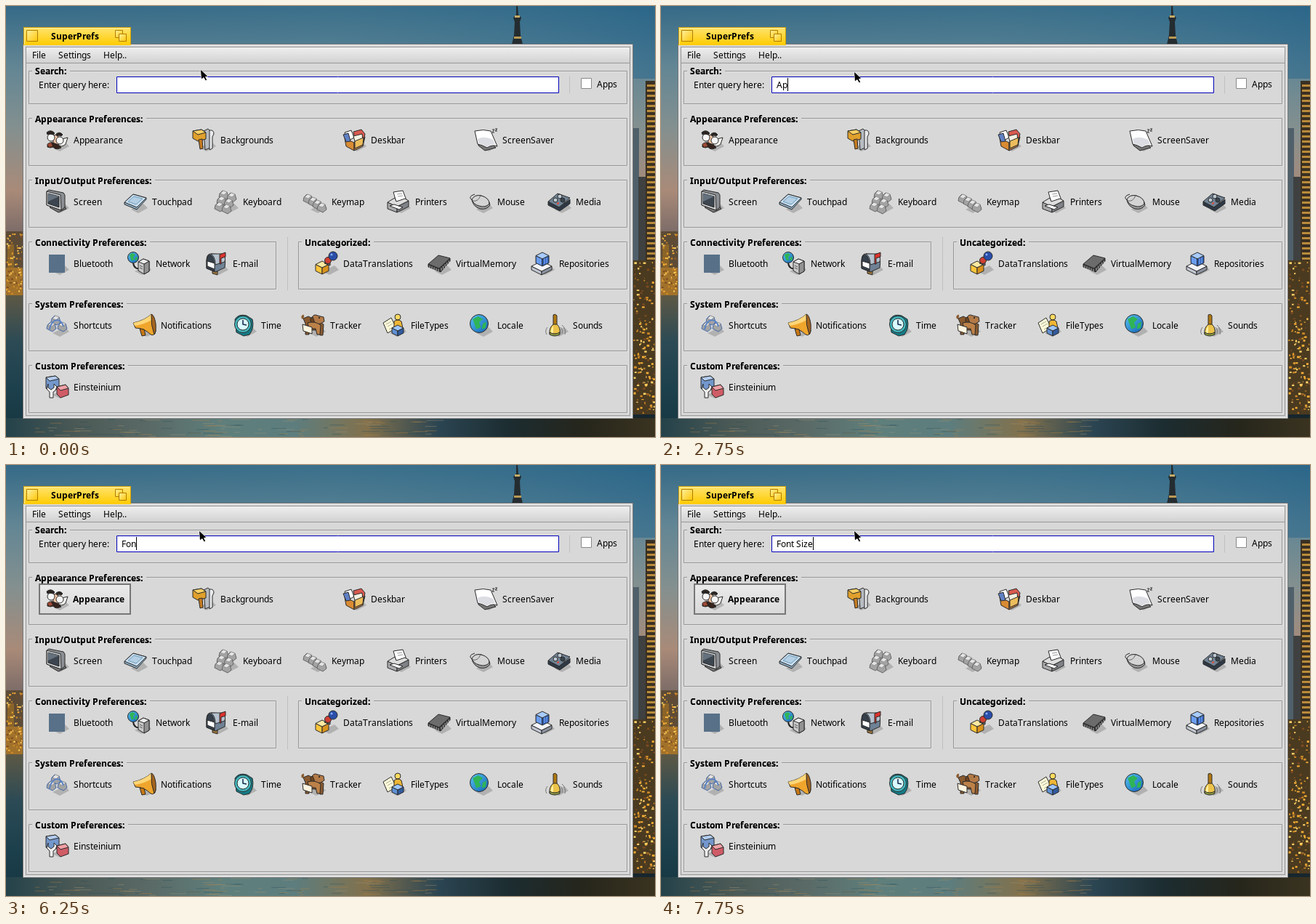
An HTML page with a canvas for the animation above (8000 ms loop, 893 by 593 pixels).

```html
<!DOCTYPE html>
<html lang="en">
<head>
<meta charset="utf-8">
<title>Preferences search</title>
<style>
html, body { margin: 0; width: 100%; height: 100%; overflow: hidden; background: #2d6585; }
canvas { display: block; width: 893px; height: 593px; }
</style>
</head>
<body>
<canvas id="stage" width="893" height="593"></canvas>
<script>
const W = 893, H = 593, LOOP = 8000;
const FONT = '12px "Noto Sans", sans-serif', BOLD = 'bold ' + FONT;
const stage = document.getElementById('stage').getContext('2d');
let c = stage;

function rect(color, x, y, w, h) { c.fillStyle = color; c.fillRect(x, y, w, h); }
function frame(color, x, y, w, h) { c.strokeStyle = color; c.lineWidth = 1; c.strokeRect(x + .5, y + .5, w - 1, h - 1); }
// Glyphs advance by whole pixels; returns the end of the text
function text(s, x, y, font = FONT) {
  c.font = font;
  c.fillStyle = '#000';
  for (const ch of s) {
    c.fillText(ch, x, y);
    x += Math.round(c.measureText(ch).width);
  }
  return x;
}
function grad(x0, y0, x1, y1, ...colors) {
  const g = c.createLinearGradient(x0, y0, x1, y1);
  colors.forEach((k, i) => g.addColorStop(i / (colors.length - 1), k));
  return g;
}
function p(fill, d, line = '#2a2a2a', width = 1) {
  const path = new Path2D(d);
  if (fill) { c.fillStyle = fill; c.fill(path); }
  if (line) { c.strokeStyle = line; c.lineWidth = width; c.lineJoin = 'round'; c.stroke(path); }
}
function disc(fill, x, y, r, line = '#2a2a2a') {
  p(fill, `M${x - r} ${y}a${r} ${r} 0 1 1 ${2 * r} 0a${r} ${r} 0 1 1 ${-2 * r} 0z`, line);
}
// Isometric block whose top face starts at its back corner (x, y)
function block(x, y, s, h, top, left, right) {
  const k = s / 2;
  p(left, `M${x - s} ${y + k}l${s} ${k}v${h}l${-s} ${-k}z`);
  p(right, `M${x + s} ${y + k}l${-s} ${k}v${h}l${s} ${-k}z`);
  p(top, `M${x} ${y}l${s} ${k}l${-s} ${k}l${-s} ${-k}z`);
}
function key(x, y, line = '#666') {
  p('#a4a4a4', `M${x} ${y + 4}l4-4 6 2 2 7-5 4-8-4z`, line);
  p('#e4e4e4', `M${x + 1} ${y + 4}l4-4 5 2-4 4z`, '#999');
}
function globe(x, y, r) {
  disc(grad(x - r, y - r, x + r, y + r, '#58c4f4', '#1262b4'), x, y, r);
  const u = r / 10;
  p('#2fb457', `M${x - 7 * u} ${y - 5 * u}l${6 * u} ${-3 * u}l${5 * u} ${3 * u}l${-4 * u} ${4 * u}l${2 * u} ${5 * u}l${-5 * u} ${2 * u}z`, null);
  p('#2fb457', `M${x + 4 * u} ${y}l${4 * u} ${-2 * u}l${-u} ${7 * u}l${-4 * u} ${u}z`, null);
}

const icons = {
  Appearance() {
    p('#f4f2ee', 'M17 14Q24 16 31 13L28 22Q22 28 17 22z');
    p('#f0c3a4', 'M11 10L17 9 20 21Q16 25 11 21z');
    disc('#f6f6f6', 8, 13, 5); disc('#f6f6f6', 20, 17, 5);
    p('#2b2421', 'M2 6Q8 1 13 7L11 9Q6 7 3 9zM15 8Q20 4 24 9L22 11Q19 9 16 11z');
    p('#35231d', 'M3 22Q8 18 13 21 19 22 22 27 14 31 11 26 7 28 3 26z');
    p('#9c4a35', 'M3 22L8 20 10 25 5 26z', null);
  },
  Backgrounds() {
    p('#b7bcc2', 'M16 4L22 1 25 4V27L18 30z');
    p('#e8eaec', 'M24 3Q30 2 30 8L28 12V28L24 30z');
    p('#e0a02c', 'M1 4L13 2 19 6V15L8 18 1 14z');
    p('#f8cf63', 'M1 4L13 2 19 6 8 9z');
    p('#c57c21', 'M9 16L14 15 15 28 11 29z');
  },
  Deskbar() {
    p('#d98b33', 'M3 14L16 20V31L5 25z'); p('#b87a45', 'M16 20L31 12 28 25 16 31z');
    p('#d95a50', 'M15 5L26 2 31 8 29 17 18 19z');
    p('#fff', 'M3 6L12 3 16 13 7 18z'); p('#5f80c4', 'M1 9L8 7 11 18 5 19z');
    p('#f4f0e0', 'M15 11L27 8 28 17 18 22z'); p('#ecbd5c', 'M17 18L29 13 28 23 17 28z');
  },
  ScreenSaver() {
    p('#777', 'M5 14L26 23 30 27 15 31 6 24z');
    p('#fff', 'M1 4Q13 1 23 4L29 18 32 25Q25 22 18 27 11 23 5 22z');
    p('#dcdde3', 'M5 15Q14 10 26 16L29 22Q22 22 18 26 11 22 6 21z', null);
    p(null, 'M25 2h3l-3 4h3M29 1h3l-3 3h3');
  },
  Screen() {
    p('#777', 'M6 24L18 31 29 26 25 20z');
    p('#8b8e92', 'M2 2L5 0 25 4 27 7V24L22 28 2 21z'); p('#d5d7d9', 'M2 2L21 7 22 28 2 21z');
    p('#3d4650', 'M4 5L19 9V24L4 19z'); p('#65717d', 'M4 5L19 9 4 16z', null);
  },
  Touchpad() {
    p('#8eaec4', 'M1 17L13 6 31 11V13L18 27 1 20z');
    p('#c9def0', 'M1 17L13 6 31 11 18 24z'); p('#b4cfe4', 'M6 16L14 9 26 12 17 20z', '#6d9bb7');
  },
  Keyboard() { key(7, 1); key(18, 4); key(4, 9); key(14, 12); key(1, 17); key(11, 20); },
  Keymap() { key(1, 6); key(8, 10); key(14, 14); key(20, 18); },
  Printers() {
    p('#fff', 'M9 3L22 1 27 14 13 17z');
    p('#a9abad', 'M1 17L14 23V31L1 26z'); p('#7f8286', 'M14 23L30 15V23L14 31z');
    p('#ddd', 'M1 17L11 11 13 16 25 12 30 15 14 23z');
    p('#fff', 'M4 22L17 27 22 24 10 20z'); p(null, 'M14 6l7-1M15 9l7-1', '#999');
  },
  Mouse() {
    p(null, 'M4 14Q-2 9 8 6');
    p('#999', 'M4 14Q8 6 17 8 28 12 29 21 24 28 15 26 6 23 4 14z');
    p('#d4d4d4', 'M4 13Q8 6 17 8 28 11 28 19 23 25 14 22 6 20 4 13z');
    p(null, 'M5 15Q12 17 16 8', '#666');
  },
  Media() {
    p('#2e3945', 'M1 16L16 24 31 13V19L17 29 1 21z');
    p('#718395', 'M1 16L14 5 31 11 16 24z');
    disc('#bcc8d0', 11, 14, 3); disc('#bcc8d0', 17, 9, 3); disc('#3a4650', 21, 14, 3);
    p('#e24a3e', 'M13 18l3-1v2l-3 1z', null);
  },
  Bluetooth() { rect('#587188', 5, 4, 22, 25); },
  Network() {
    p(null, 'M8 16Q10 25 18 23', '#222', 2);
    globe(8, 8, 7.5);
    p('#c9c9c9', 'M15 14L22 10 30 13V27L23 31 15 26z'); p('#929292', 'M23 17L30 13V27L23 31z');
    p('#ececec', 'M15 14L22 10 30 13 23 17z');
    p(null, 'M17 19l4 2M17 22l4 2', '#555');
  },
  'E-mail'() {
    p('#9d753c', 'M11 24L18 27V32L11 30z');
    p('#6f8194', 'M3 12Q3 2 10 3L26 4Q30 8 28 22L15 28 3 23z');
    p('#b6c2ce', 'M9 3L25 3Q30 7 28 14L15 18Q15 7 9 3z');
    p('#35404b', 'M3 12Q4 3 9 5 14 8 14 27L3 23z'); p('#fff', 'M4 13L14 16V24L4 20z');
    p('#db332d', 'M21 4L29 1V7L23 9V17L21 17z');
  },
  DataTranslations() {
    block(10, 13, 9, 9, '#ffe9a0', '#ffc53a', '#d8921d');
    p('#777', 'M13 16l8-4v7z');
    disc('#cf4034', 18, 12, 4.5); disc('#2a4ea8', 25, 6, 6); disc('#88adff', 23, 4, 1.5, null);
  },
  VirtualMemory() {
    p('#333', 'M1 17L16 23 31 9V13L18 28 1 21z');
    p('#6c6c6c', 'M1 17L15 5 31 9 16 23z');
    for (let i = 0; i < 5; i++) p(null, `M${3 + 3 * i} ${19 + 1.2 * i}v4M${19 + 2.6 * i} ${22 - 2.4 * i}v4`, '#bbb');
  },
  Repositories() {
    block(15, 13, 14, 5, '#f2f4f8', '#c1c6d0', '#8b929e');
    block(16, 1, 9, 10, '#a8cbff', '#5a91e8', '#2f61b8');
    p(null, 'M10 8v8M13 9v8M19 9v8M22 8v8', '#8db7ff');
  },
  Shortcuts() {
    key(9, 3, '#456aa8'); key(3, 12, '#456aa8'); key(18, 12, '#456aa8');
    p(null, 'M6 22Q8 10 16 9 23 10 25 18', '#5b83c4', 2);
  },
  Notifications() {
    p('#f0a52c', 'M1 13Q16 10 26 1L32 24Q30 32 25 29 16 20 4 20z');
    p('#ffd677', 'M1 13Q16 10 26 1L28 8Q17 15 3 17z', null);
    p('#a5651e', 'M26 1Q30 2 32 14 33 26 30 29 25 16 26 1z');
    p('#c77815', 'M10 21L16 22 18 30 13 31z');
  },
  Time() {
    p('#147b86', 'M3 8Q8 0 19 3L27 8Q30 20 23 29L15 31 5 26z');
    disc('#43b8bf', 14, 15, 11.5); disc('#d9fbff', 14, 15, 8); p(null, 'M14 9V15L19 16', '#124', 1.5);
  },
  Tracker() {
    p('#8a5a2f', 'M2 7L9 4 17 8 30 15 29 30H25L23 23 10 23V29H5V14z');
    p('#b37a48', 'M14 6Q16 0 22 3L30 5 31 11 26 14 18 15z'); p('#70451f', 'M15 5Q10 6 13 13L18 13z');
    p('#bc8148', 'M8 13Q18 10 26 16L25 29H21L19 21 10 21z');
    p('#fff4df', 'M1 15L14 19V28L2 24z'); disc('#111', 24, 6, 1, null); p(null, 'M2 7Q-1 4 3 3', '#8a5a2f', 3);
  },
  FileTypes() {
    p('#fffbd9', 'M1 13L12 6 19 20 7 27z'); p(null, 'M5 15l7-4M7 18l7-4M9 22l7-4', '#aa9');
    disc('#ffda60', 21, 5, 4); p('#eeb635', 'M16 11Q21 7 26 11L28 20 16 22z');
    block(21, 16, 8, 7, '#9ec6ff', '#5f91d5', '#315b9e');
  },
  Locale() { globe(14, 14, 12.5); },
  Sounds() {
    p('#b27912', 'M12 2Q15 0 17 3L17 16H12z');
    p('#ecc34a', 'M12 15H17Q22 19 21 27 16 32 7 28 6 20 12 15z'); p('#ffef9e', 'M12 17Q8 22 9 27L12 27z', null);
    p('#8c9940', 'M7 26Q14 30 21 26V29Q14 33 7 29z');
    p(null, 'M4 19Q0 24 3 29M24 16Q30 21 28 29M22 19Q26 23 24 28', '#777');
  },
  Einsteinium() {
    p('#7397cc', 'M1 3L14 1 19 5V18L6 22 1 18z'); p('#b3cdf0', 'M1 3L14 1 19 5 6 8z');
    p('#cf5c66', 'M16 16L28 13 32 18V27L21 31 16 26z'); p('#f0a0a5', 'M16 16L28 13 32 18 21 21z');
    p('#eee', 'M4 12V17L8 20 12 17V12L16 16 14 21 11 23V31H6V23L2 19z');
  }
};

const groups = [
  ['Search:', 31, 89, 824, 46],
  ['Appearance Preferences:', 31, 154, 824, 66, 'Appearance 93 Backgrounds 295 Deskbar 502 ScreenSaver 683'],
  ['Input/Output Preferences:', 31, 239, 824, 66, 'Screen 93 Touchpad 201 Keyboard 326 Keymap 448 Printers 563 Mouse 676 Media 784'],
  ['Connectivity Preferences:', 31, 324, 341, 66, 'Bluetooth 93 Network 206 E-mail 312'],
  ['Uncategorized:', 402, 324, 453, 66, 'DataTranslations 464 VirtualMemory 619 Repositories 761'],
  ['System Preferences:', 31, 409, 824, 66, 'Shortcuts 93 Notifications 213 Time 351 Tracker 446 FileTypes 557 Locale 676 Sounds 780'],
  ['Custom Preferences:', 31, 494, 824, 66, 'Einsteinium 93']
];

function item(name, x, y, picked) {
  if (picked) {
    rect('#777', 45, y - 21, 127, 43);
    rect(grad(0, y - 19, 0, y + 20, '#eaeaea', '#d9d9d9'), 47, y - 19, 123, 39);
  }
  c.save();
  c.translate(x - 39, y - 16);
  p('rgba(0,0,0,.18)', 'M10 27L27 19 33 25 20 32z', null);
  icons[name]();
  c.restore();
  text(name, picked ? x - 1 : x, y + 5, picked ? BOLD : FONT);
}

function groupBox([title, x, y, w, h, list], picked) {
  frame('#e0e0e0', x + 1, y + 1, w, h);
  frame('#979797', x, y, w, h);
  const base = y + (list ? 6 : 5);
  const end = text(title, x + 9, base, BOLD);
  rect('#d8d8d8', x + 5, y - 1, end - x, 4);
  const words = list ? list.split(' ') : [];
  for (let i = 0; i < words.length; i += 2)
    item(words[i], +words[i + 1], y + 30, picked && words[i] === 'Appearance');
  text(title, x + 9, base, BOLD);
}

function city() {
  rect(grad(0, 0, 0, H, '#356a87', '#638694', '#84908f', '#a98a78', '#675d60', '#394c50', '#1f4450', '#123644'), 0, 0, W, H);
  rect(grad(0, 0, W, 0, 'rgba(80,125,145,0)', 'rgba(75,128,150,.25)', 'rgba(33,98,138,.5)'), 0, 0, W, 100);
  p('#242c30', 'M702 0h2l1 12 4 4-2 6 1 18 3 13H696l3-13 1-18-2-6 4-4z', null);
  rect('#c4ab68', 700, 13, 7, 3);
  rect('#b89a55', 699, 42, 10, 3);

  rect('#5d4b36', 0, 310, 24, 88);
  rect('#8a6429', 2, 328, 9, 70);
  rect('#a2722b', 0, 360, 24, 38);
  rect(grad(0, 398, 0, H, '#5d5845', '#2b4a55', '#1c404c', '#153540'), 0, 398, 24, 195);

  rect('#50606a', 863, 168, 8, 240);
  rect('#3f4040', 870, 235, 12, 180);
  rect('#3a3022', 880, 103, 13, 340);
  for (let y = 108; y < 390; y += 7) rect('#b98b3b', 882, y, 11, 3);
  rect('#4a3a20', 862, 350, 31, 215);
  rect('#17262d', 862, 562, 31, 31);

  rect(grad(0, 0, W, 0, '#24424a', '#4c5a56', '#5a6a66', '#5f7f7c', '#5d7d7e', '#82714c', '#2b4552', '#1c2c30', '#26261c', '#3a3320'), 0, 567, W, 26);
  let seed = 7;
  const rnd = () => (seed = seed * 16807 % 2147483647) / 2147483647;
  for (let i = 0; i < 260; i++) {
    c.fillStyle = ['#ffd367', '#d18b25', '#f5ad35', '#7b4b20'][i % 4];
    if (i % 3 === 0) c.fillRect(rnd() * 22, 312 + rnd() * 84, 1 + rnd() * 2, 2);
    else c.fillRect(863 + rnd() * 28, 352 + rnd() * 208, 1 + rnd() * 3, 1 + rnd() * 2);
  }
  for (let i = 0; i < 90; i++)
    rect(['#b88445', '#264c58', '#a49678'][i % 3] + '66', 40 + rnd() * 550, 568 + rnd() * 24, 5 + rnd() * 22, 1);
}

function dots(x, y0, y1) { for (let y = y0; y < y1; y += 2) rect('#a8a8a8', x, y, 1, 1); }

function yellowBox(x, y, s) {
  rect(grad(x, y, x + s, y + s, '#fff3a4', '#ffc400'), x, y, s, s);
  frame('#b37b00', x, y, s, s);
}

function paint(picked) {
  const sheet = document.createElement('canvas');
  sheet.width = W; sheet.height = H;
  c = sheet.getContext('2d');
  city();
  rect('#777', 23, 52, 840, 516);
  rect('#eee', 24, 53, 838, 514);
  rect('#d8d8d8', 25, 54, 836, 512);
  frame('#999', 27, 56, 832, 508);
  rect(grad(0, 29, 0, 54, '#ffe471', '#ffcb00'), 24, 29, 148, 25);
  p(null, 'M24.5 53V29.5H171.5V53', '#d5a000');
  p(null, 'M25.5 53V30.5H170', '#fff0a8');
  yellowBox(28, 33, 16);
  yellowBox(150, 33, 11);
  yellowBox(155, 38, 11);
  text('SuperPrefs', 62, 46, BOLD);
  rect(grad(0, 57, 0, 78, '#eee', '#d2d2d2'), 28, 57, 830, 21);
  rect('#999', 28, 78, 830, 1);
  text('File', 36, 72);
  text('Settings', 72, 72);
  text('Help..', 134, 72);
  groups.forEach(g => groupBox(g, picked));
  text('Enter query here:', 45, 113);
  rect('#fff', 152, 97, 609, 23);
  frame('#0000b8', 152, 97, 609, 23);
  dots(775, 97, 120);
  dots(387, 318, 391);
  rect('#fff', 791, 99, 15, 15);
  frame('#888', 791, 99, 15, 15);
  text('Apps', 813, 112);
  c = stage;
  return sheet;
}

const plain = paint(false), chosen = paint(true);

const typing = [[0, ''], [2750, 'Ap'], [3000, 'App'], [3250, 'Appe'], [3500, 'Appea'], [4500, 'Appe'], [5000, ''],
  [5750, 'F'], [6250, 'Fon'], [6500, 'Font'], [6750, 'Font '], [7000, 'Font S'], [7250, 'Font Si'], [7500, 'Font Siz'], [7750, 'Font Size']];
const pointer = [[0], [500, hand, 128, 43], [750, hand, 145, 140], [1000, hand, 197, 128],
  [1250, beam, 196, 96], [1500, beam, 195, 103], [1750, beam, 194, 104], [2000, beam, 195, 106], [2750]];
const at = (steps, t) => steps.filter(s => s[0] <= t).pop();
const within = (t, a, b) => t >= a && t < b;

function arrow() {
  p('#000', 'M1 1L2 14 5 11.5 7.5 16 9.5 15 7.5 10.5 10.5 10z', '#fff');
  p('#000', 'M1 1L2 13 5 10.5 8 15 9 14.5 6.5 10 10 9.5z', null);
}
function hand() {
  p('#fff', 'M1 2Q2 0 4 2L8 6Q11 4 13 6 17 8 17 11L18 14 13 15Q8 15 7 13L3 12Q2 10 4 10L6 10z');
}
function beam() {
  const d = 'M1.5 2H3.5L4 3 4.5 2H6.5M4 3V15M1.5 16H3.5L4 15 4.5 16H6.5';
  p(null, d, '#fff', 3);
  p(null, d, '#000', 1);
}
function place(draw, x, y) { c.save(); c.translate(x, y); draw(); c.restore(); }

function draw(t) {
  c.drawImage(within(t, 3000, 5000) || t >= 6250 ? chosen : plain, 0, 0);
  const end = text(at(typing, t)[1], 159, 113);
  if (within(t, 250, 1250) || within(t, 2250, 4250) || t >= 4500) rect('#000', end, 99, 1, 18);
  if (t < 250) place(arrow, 267, 87); else place(arrow, 265, 90);
  const [, shape, x, y] = at(pointer, t);
  if (shape) place(shape, x, y);
}

const start = performance.now();
function tick() {
  draw((performance.now() - start) % LOOP);
  requestAnimationFrame(tick);
}
tick();
</script>
</body>
</html>
```
